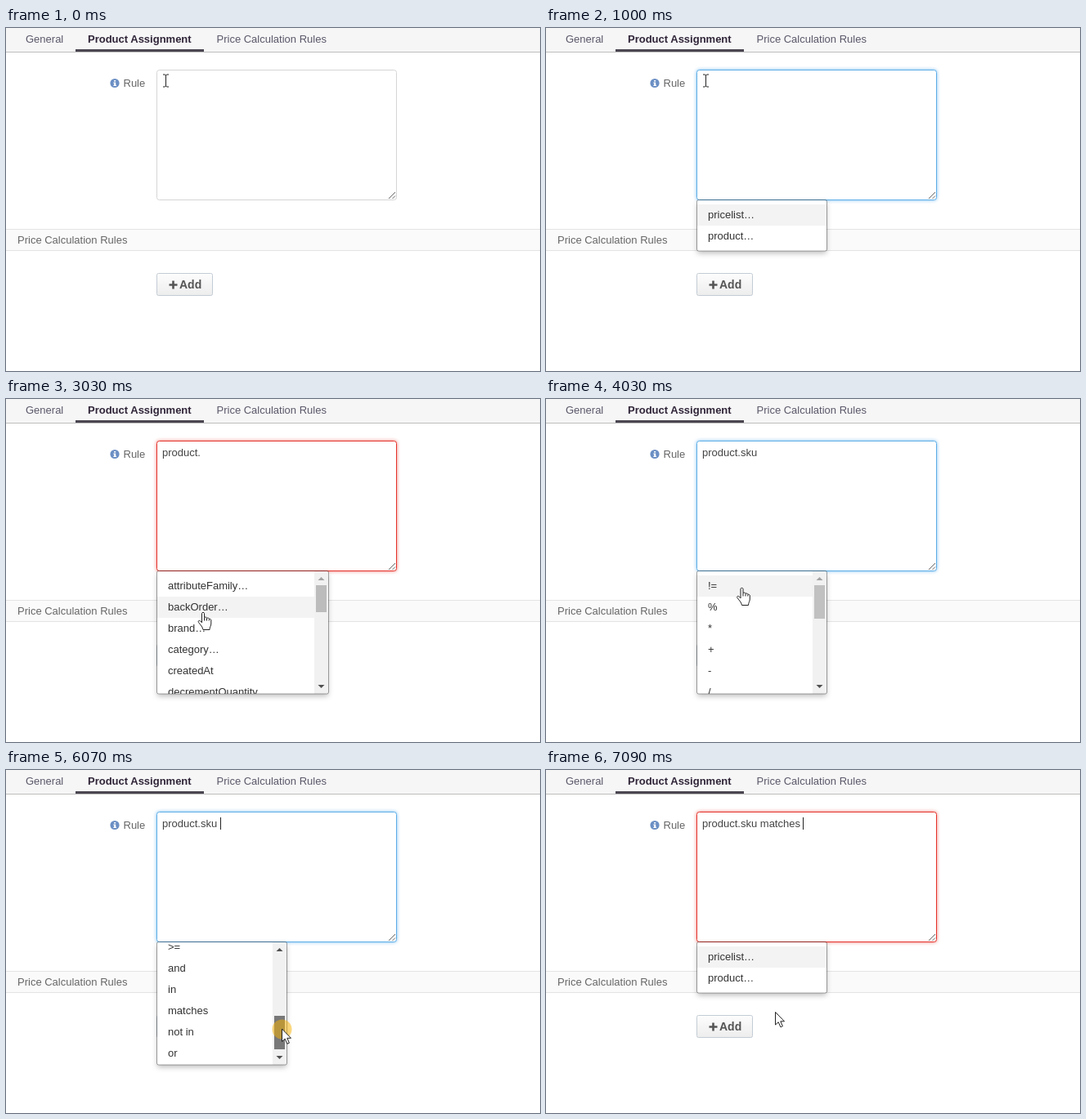
Write an HTML page that moves like this. It is 653 by 420 pixels and loops after 8000 ms.

```html
<!DOCTYPE html>
<html lang="en">
<head>
<meta charset="utf-8">
<title>Product assignment rule</title>
<style>
  html, body { margin: 0; width: 100%; height: 100%; overflow: hidden; background: #fff; }
  svg { display: block; font: 13px "Liberation Sans", Arial, sans-serif; fill: #666; }
  .bold { font-weight: bold; }
  .list text { fill: #333; }
  .panel { fill: #fff; filter: drop-shadow(0 3px 3px rgba(0, 0, 0, .25)); }
  .cursor { fill: #fff; stroke: #222; stroke-linejoin: round; }
</style>
</head>
<body>
<svg width="653" height="420" viewBox="0 0 653 420">
  <defs>
    <linearGradient id="buttonFill" x2="0" y2="1">
      <stop stop-color="#fdfdfd"/><stop offset="1" stop-color="#ededed"/>
    </linearGradient>
    <clipPath id="listClip"><rect x="184" y="211" width="211" height="150"/></clipPath>
  </defs>

  <rect width="653" height="29" fill="#f6f6f7"/>
  <rect y="29" width="653" height="1" fill="#bdbdbd"/>
  <rect x="85" y="26" width="157" height="3" fill="#4b4651"/>
  <g fill="#5a5868">
    <text x="24" y="18">General</text>
    <text x="100" y="18" class="bold" fill="#2f2437">Product Assignment</text>
    <text x="257.5" y="18">Price Calculation Rules</text>
  </g>

  <circle cx="133" cy="67.5" r="5.6" fill="#6b8fc4"/>
  <path d="M132 64h2.2v1.6h-2.2zM131.4 66.6h2.8v3.2h.8v1.2h-3.6v-1.2h.8v-2h-.8z" fill="#fff"/>
  <text x="143.5" y="72">Rule</text>

  <path d="M0 246.5H653M0 272.5H653" stroke="#e4e4e4"/>
  <rect y="247" width="653" height="25" fill="#fafafa"/>
  <text x="14" y="264">Price Calculation Rules</text>

  <rect x="184.5" y="300.5" width="68" height="27" rx="2" fill="url(#buttonFill)" stroke="#c3ccd5"/>
  <path d="M204.5 309.5v10M199.5 314.5h10" stroke="#555" stroke-width="2.6"/>
  <text x="212" y="319" class="bold" font-size="14" fill="#555">Add</text>

  <rect id="field" x="184.5" y="51.5" width="293" height="159" rx="3" fill="#fff"/>
  <path d="M468 209l8-8M472.500 209l3.500-3.500" stroke="#666"/>
  <g id="scene"></g>
</svg>
<script>
const LOOP = 8000, ROW = 26, LIST_TOP = 211, VIEW = 150;
const field = document.getElementById('field');
const scene = document.getElementById('scene');

const roots = ['pricelist…', 'product…'];
const fields = ['attributeFamily…', 'backOrder…', 'brand…', 'category…', 'createdAt', 'decrementQuantity'];
const operators = ['!=', '%', '*', '+', '-', '/', '&lt;', '&lt;=', '==', '>', '>=',
  'and', 'in', 'matches', 'not in', 'or'];

const looks = {
  idle: ['#d5d5d5', 'none'],
  fading: ['#9fc6e6', 'none'],
  focus: ['#5eaee6', 'drop-shadow(0 0 2px rgba(82,168,236,.75))'],
  error: ['#e5322b', 'drop-shadow(0 0 2px rgba(229,50,43,.65))']
};

const shapes = {
  beam: '<path fill="none" d="M-3.500 -7h2.500l1 1l1 -1h2.500M0 -6v13M-3.500 8h2.500l1 -1l1 1h2.500"/>',
  arrow: '<path d="M0 0V15.500L3.700 12.200L6.400 18.300L8.900 17.200L6.300 11.300H11Z"/>',
  hand: '<path d="M5 1.500C5 0 8 0 8 1.500V6.500C9 5.700 10.700 6 11 7.300C12 6.700 13.400 7 13.800 8.200' +
    'C15 8 16.300 8.600 16.300 10V14C16.300 17 14.500 18 14.500 21.500H6.500C6 18 3.500 16 1 12.500' +
    'C-.2 10.700 2 9.600 3.300 11L5 12.800Z"/><path fill="none" d="M8 6.500v4M11 7.500v3M13.800 8.500v2"/>'
};

const states = [
  { at: 0, look: 'idle', cursor: ['beam', 195.5, 64] },
  { at: 1000, look: 'focus', items: roots, active: 0, cursor: ['beam', 195.5, 64] },
  { at: 2020, look: 'fading', items: roots, active: 1, cursor: ['arrow', 237, 250.5] },
  { at: 3030, look: 'error', text: 'product.', items: fields, active: 1, width: 210,
    bar: { y: 228, h: 33, color: '#bcbcbc' }, cursor: ['hand', 234.5, 261] },
  { at: 4030, look: 'focus', text: 'product.sku', items: operators, active: 0,
    bar: { y: 228, h: 41, color: '#c1c1c1' }, cursor: ['hand', 233, 231] },
  { at: 5050, look: 'focus', text: 'product.sku', items: operators, active: 0,
    bar: { y: 228, h: 41, color: '#a8a8a8' }, cursor: ['arrow', 330, 244.5] },
  { at: 6070, look: 'focus', text: 'product.sku', caret: 262, items: operators, active: 0, scroll: 272,
    bar: { y: 301, h: 41, color: '#787878' }, cursor: ['arrow', 337.5, 317], pressed: true },
  { at: 7090, look: 'error', text: 'product.sku matches', caret: 314, items: roots, active: 0,
    cursor: ['arrow', 280.5, 296.5] }
];

const rect = (x, y, w, h, fill) => `<rect x="${x}" y="${y}" width="${w}" height="${h}" fill="${fill}"/>`;

function scrollbar(right, { y, h, color }, scrolled) {
  const x = right - 17, mid = right - 8.5;
  return rect(x, LIST_TOP, 17, VIEW, '#f1f1f1') + rect(x + 2, y, 13, h, color) +
    `<path d="M${mid - 4} 222h8l-4 -4z" fill="${scrolled ? '#505050' : '#a3a3a3'}"/>` +
    `<path d="M${mid - 4} 350h8l-4 4z" fill="#505050"/>`;
}

function dropdown({ items, active, width = 159, bar, scroll = 0 }) {
  const height = bar ? VIEW : items.length * ROW + 10;
  const inner = bar ? width - 18 : width - 1;
  const rows = items.map((label, i) => {
    const y = LIST_TOP + 5 + i * ROW - scroll;
    return (i === active ? rect(185, y, inner, ROW, '#f3f3f3') : '') +
      `<text x="198" y="${y + 17}">${label}</text>`;
  }).join('');
  return `<g class="list"><rect class="panel" x="185" y="211" width="${width - 1}" height="${height}" rx="2"/>
    <g clip-path="url(#listClip)">${rows}${bar ? scrollbar(184 + width, bar, scroll) : ''}</g>
    <rect x="184.500" y="210.500" width="${width}" height="${height + .5}" rx="2" fill="none" stroke="#000" stroke-opacity=".33"/></g>`;
}

function draw(state) {
  const [border, glow] = looks[state.look];
  const [shape, x, y] = state.cursor;
  field.style.stroke = border;
  field.style.filter = glow;
  scene.innerHTML =
    (state.text ? `<text x="191" y="70" fill="#444">${state.text}</text>` : '') +
    (state.caret ? rect(state.caret, 58, 1, 15, '#222') : '') +
    (state.items ? dropdown(state) : '') +
    (state.pressed ? '<circle cx="337.500" cy="317.500" r="12" fill="#fab400" fill-opacity=".5"/>' : '') +
    `<g class="cursor" transform="translate(${x} ${y})">${shapes[shape]}</g>`;
}

let shown;
function tick() {
  const time = performance.now() % LOOP;
  const state = states.findLast(s => s.at <= time);
  if (state !== shown) draw(shown = state);
  requestAnimationFrame(tick);
}
tick();
</script>
</body>
</html>
```
